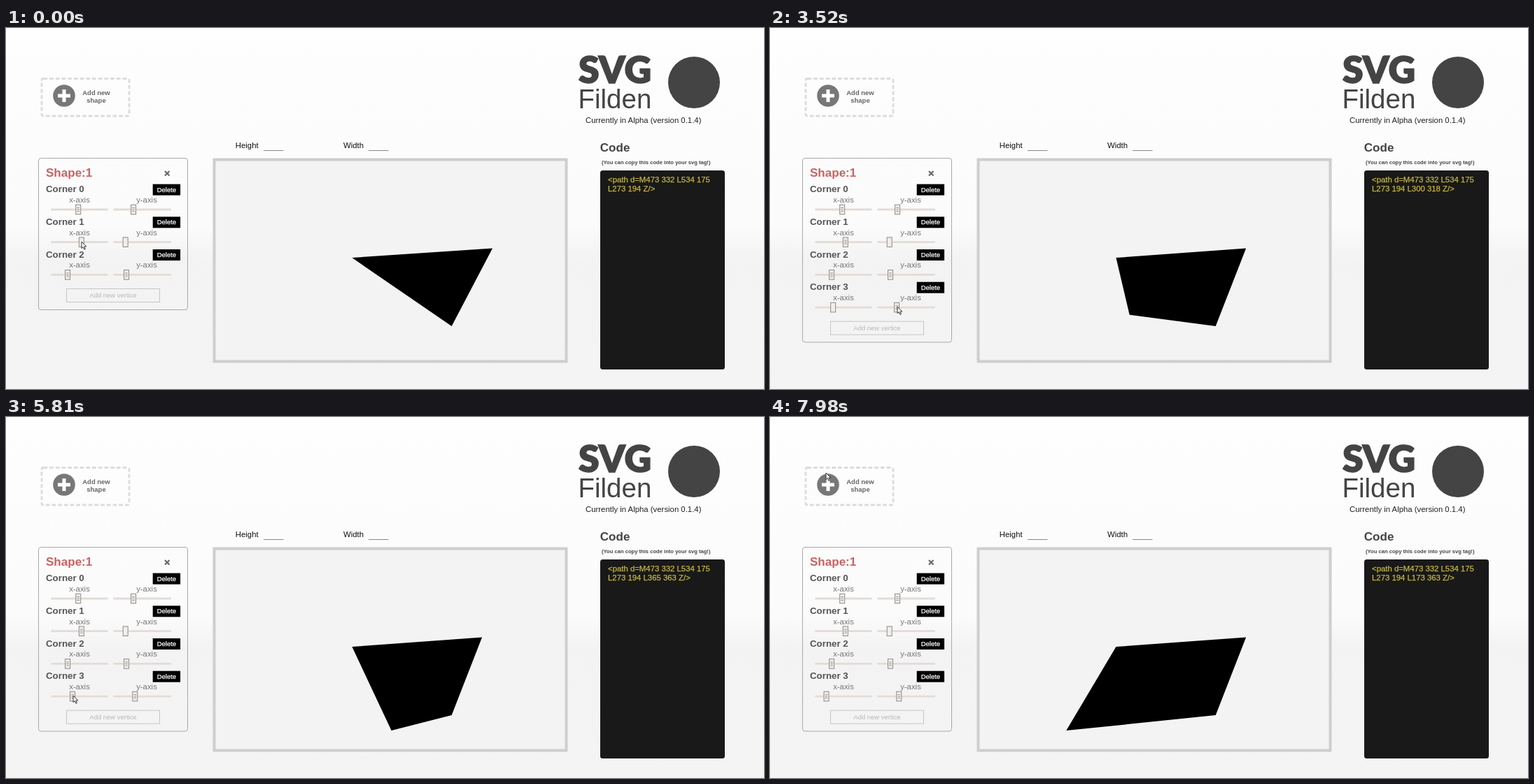
Write an HTML page that moves like this. It is 1083x517 px and loops after 8 s.

```html
<!DOCTYPE html>
<html lang="en">
<head>
<meta charset="utf-8">
<title>SVG Filden</title>
<style>
  html, body { margin: 0; width: 100%; height: 100%; overflow: hidden; background: #f4f4f4; }
  svg { display: block; width: 1083px; height: 517px; }
  text { font-family: "Liberation Sans", Arial, sans-serif; font-size: 11.36px; white-space: pre; }
  .b { font-weight: bold; }
  .small { font-size: 9.46px; }
  .big { font-size: 17.04px; }
  .mid { text-anchor: middle; }
  .code { fill: #c9ba3e; stroke: #c9ba3e; stroke-width: .25; }
</style>
</head>
<body>
<svg viewBox="0 0 1083 517" xmlns="http://www.w3.org/2000/svg">
  <defs>
    <linearGradient id="bg" x1="0" y1="0" x2="0" y2="1">
      <stop offset="0" stop-color="#fefefe"/>
      <stop offset=".55" stop-color="#fbfbfb"/>
      <stop offset=".64" stop-color="#f3f3f3"/>
      <stop offset="1" stop-color="#f4f4f4"/>
    </linearGradient>
  </defs>
  <rect width="1083" height="517" fill="url(#bg)"/>

  <!-- add shape -->
  <rect x="51" y="72.5" width="125" height="53.5" rx="2.5" fill="none" stroke="#dcdcdc" stroke-width="2.8" stroke-dasharray="5.7 3"/>
  <circle cx="83" cy="97" r="15.8" fill="#777"/>
  <path d="M74 97H92M83 88V106" stroke="#fff" stroke-width="5"/>
  <g class="b" fill="#666">
    <text class="small mid" x="129" y="96">Add new</text>
    <text class="small mid" x="129" y="107.3">shape</text>
  </g>

  <!-- heading -->
  <text x="818" y="79.3" fill="#444" stroke="#444" stroke-width="1.4" style="font:900 53.5px Lato,sans-serif">SVG</text>
  <text x="817.5" y="115" fill="#444" style="font-size:38.5px">Filden</text>
  <circle cx="983" cy="78" r="37" fill="#444"/>
  <text x="828" y="136.2" fill="#222">Currently in Alpha (version 0.1.4)</text>

  <!-- stage -->
  <text x="327.8" y="172" fill="#111">Height</text>
  <text x="482" y="172" fill="#111">Width</text>
  <path d="M368 175.5H396.5M518 175.5H546.5" stroke="#888"/>
  <rect x="297.5" y="188.5" width="503" height="289" fill="#f3f3f3" stroke="#cecece" stroke-width="4"/>
  <polygon id="shape"/>

  <!-- code -->
  <text class="b big" x="848.8" y="177" fill="#444">Code</text>
  <text class="b" x="851" y="194.6" fill="#444" style="font-size:7.61px">(You can copy this code into your svg tag!)</text>
  <rect x="849" y="204" width="178" height="285" rx="3.5" fill="#191919"/>
  <text class="code" x="860" y="221">&lt;path d=M473 332 L534 175</text>
  <text class="code" id="code" x="860" y="234"></text>

  <!-- corner panel -->
  <rect id="panel" x="46.5" y="186.5" width="213" rx="3.5" fill="none" stroke="#a9a9a9"/>
  <text class="b big" x="57" y="212.6" fill="#c46464">Shape:1</text>
  <path d="M227 205L233.5 211.5M233.5 205L227 211.5" stroke="#6a6a6a" stroke-width="2.3"/>
  <g id="rows"></g>
  <g id="add">
    <rect x="86.5" y="373.5" width="133" height="19" fill="none" stroke="#c6c6c6"/>
    <text class="small mid" x="153" y="386.3" fill="#b8b8b8">Add new vertice</text>
  </g>

  <path id="cursor" d="M0 0V9.6L2.2 7.6L3.8 11.2L5.4 10.5L3.8 7H6.8Z" fill="#fff" stroke="#222" stroke-width=".9" stroke-linejoin="round"/>
</svg>
<script>
const LOOP = 8000, ROW = 46.7, ADDED = 1600;
const $ = id => document.getElementById(id);
const place = (el, x, y) => el.setAttribute("transform", `translate(${x.toFixed(2)} ${y.toFixed(2)})`);
const mix = (a, b, u) => a + (b - a) * u;
const thumbAt = { x: v => 67.5 + .0755 * v, y: v => 158 + .0725 * v };
const corners = [[473, 332], [534, 175], [273, 194]];

// Glides bend the cursor's way past "via"; drags change one coordinate of the new corner.
const moves = [
  { t0: 520, t1: 1440, n: 10, to: [139, 385], via: [80, 460] },
  { t0: ADDED, t1: 2320, n: 6, to: [176, 390], via: [160, 380] },
  { t0: 2660, t1: 2900, n: 4, to: [175, 400], via: [176, 395] },
  { t0: 3310, t1: 4150, n: 7, axis: "y", value: 363, cy: 397 },
  { t0: 4660, t1: 5000, n: 5, to: [97, 399], via: [140, 424] },
  { t0: 5320, t1: 5810, n: 5, axis: "x", value: 365, cy: 399 },
  { t0: 5920, t1: 6260, n: 3, axis: "x", value: 360, cy: 402 },
  { t0: 6370, t1: 6890, n: 4, axis: "x", value: 173, cy: 406, power: 1.6 },
  { t0: 7030, t1: 7360, n: 3, to: [61, 298], via: [62, 350] },
  { t0: 7460, t1: 7980, n: 7, to: [80, 80], via: [20, 8] }
];

function stateAt(t) {
  let cursor = [108, 306], corner = { x: 300, y: 300 }, drawn = corner;
  for (const { t0, t1, n, to, via, axis, value, cy, power = 1 } of moves) {
    if (t < t0) break;
    const gap = (t1 - t0) / (n - 1);
    const step = Math.min(n - 1, Math.floor((t - t0) / gap));
    const u = (step + 1) / n;
    if (to) {
      cursor = cursor.map((c, i) => mix(mix(c, via[i], u), mix(via[i], to[i], u), u));
    } else {
      const from = corner[axis];
      const at = k => ({ ...corner, [axis]: mix(from, value, (k / n) ** power) });
      // the drawing trails the slider by one step
      drawn = at(t >= t1 + gap ? n : step);
      corner = at(step + 1);
      cursor = [thumbAt[axis](corner[axis]) + 1, mix(cursor[1], cy, u)];
    }
  }
  return { cursor, corner, drawn };
}

const thumb = (i, axis) => `<g id="${axis}${i}"><rect x="-3.5" y="-6.8" width="7" height="13.6" fill="#f0eeeb" stroke="#8e8a86"/>
  <path d="M-1.8 -2.5H1.8M-1.8 0H1.8M-1.8 2.5H1.8" stroke="#8e8a86" stroke-width=".9"/></g>`;

const row = i => `<g id="row${i}" transform="translate(0 ${ROW * i})">
  <text class="b" x="57" y="235.3" fill="#555" style="font-size:13.3px">Corner ${i}</text>
  <rect x="209.7" y="223.6" width="39.4" height="16"/>
  <text class="small mid" x="229.4" y="234.8" fill="#fff" stroke="#fff" stroke-width=".25">Delete</text>
  <text class="mid" x="105" y="250" fill="#777">x-axis</text>
  <text class="mid" x="201" y="250" fill="#777">y-axis</text>
  <path d="M64.5 260H145.5M153.5 260H236" stroke="#e3dcd6" stroke-width="2.8"/>
  ${thumb(i, "x")}${thumb(i, "y")}</g>`;

$("rows").innerHTML = [0, 1, 2, 3].map(row).join("");

function setThumb(i, axis, value, grip) {
  const el = $(axis + i);
  place(el, thumbAt[axis](value), 260);
  el.lastElementChild.style.display = grip ? "" : "none";
}

function draw(t) {
  const { cursor, corner, drawn } = stateAt(t), four = t >= ADDED;
  const x = Math.round(corner.x), y = Math.round(corner.y);
  const pts = corners.map(c => [...c]);
  // corner 1 is still settling at the start
  if (t < 520) pts[1][0] = t < 170 ? 555 : 538;
  if (four) pts.push([drawn.x, drawn.y]);
  $("shape").setAttribute("points", pts.map(([px, py]) => [300.2 + .7115 * px, 191.2 + .7105 * py]).join(" "));
  $("code").textContent = `L273 194 ${four ? `L${x} ${y} ` : ""}Z/>`;

  corners.forEach(([cx, cy], i) => {
    setThumb(i, "x", cx, i !== 1 || t >= 520);
    setThumb(i, "y", cy, i !== 1);
  });
  setThumb(3, "x", x, t >= 5000);
  setThumb(3, "y", y, t >= 2320);
  $("row3").style.display = four ? "" : "none";
  $("panel").setAttribute("height", four ? 263.5 : 217);
  place($("add"), 0, four ? ROW : 0);
  place($("cursor"), ...cursor);
}

const start = performance.now();
function tick() {
  draw((performance.now() - start) % LOOP);
  requestAnimationFrame(tick);
}
tick();
</script>
</body>
</html>
```
